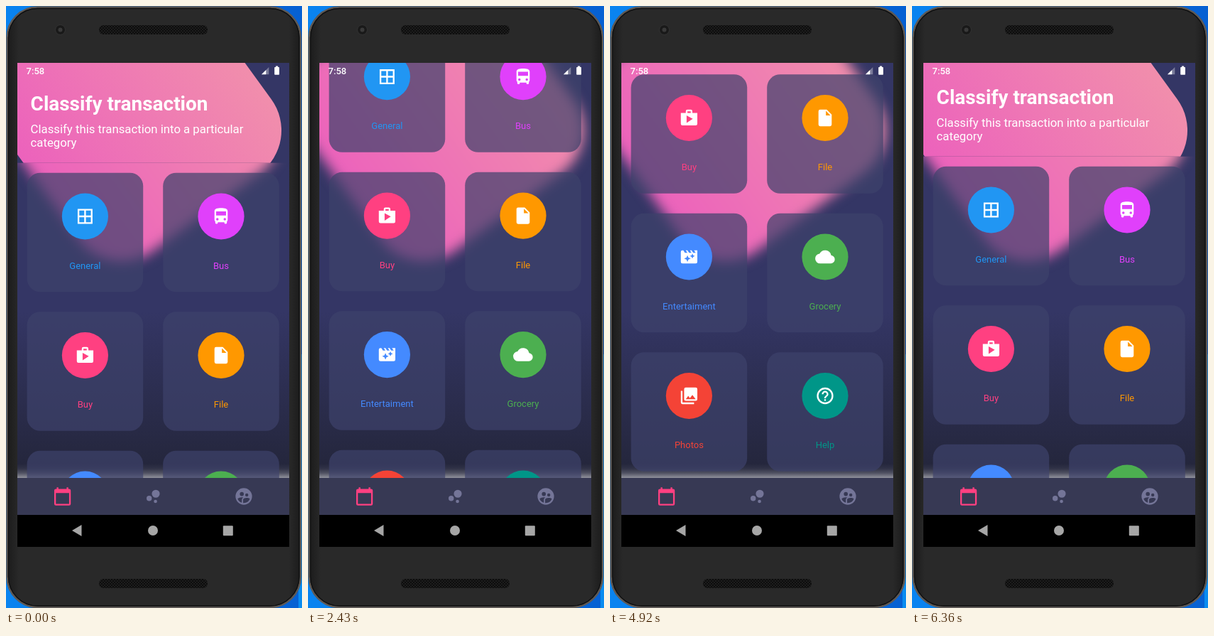
An HTML page that plays this animation: 417 by 847 pixels, repeating every 8550 ms.

```html
<!DOCTYPE html>
<html lang="en">
<head>
<meta charset="utf-8">
<title>Classify transaction</title>
<style>
  html, body { margin: 0; width: 100%; height: 100%; overflow: hidden; background: #0a6fe0; }
  svg { display: block; width: 417px; height: 847px; font-family: Roboto, sans-serif; }
  .label { font-size: 13px; text-anchor: middle; }
  .icon { fill-rule: evenodd; }
</style>
</head>
<body>
<svg viewBox="0 0 417 847">
  <defs>
    <linearGradient id="desk">
      <stop stop-color="#0a84f0"/><stop offset="1" stop-color="#0660d2"/>
    </linearGradient>
    <linearGradient id="shell">
      <stop stop-color="#1b1b1b"/><stop offset=".04" stop-color="#292929"/>
      <stop offset=".96" stop-color="#292929"/><stop offset="1" stop-color="#1b1b1b"/>
    </linearGradient>
    <linearGradient id="night" gradientUnits="userSpaceOnUse" x1="0" y1="430" x2="0" y2="664">
      <stop stop-color="#343665"/><stop offset="1" stop-color="#232539"/>
    </linearGradient>
    <linearGradient id="pink">
      <stop stop-color="#ec62bc"/><stop offset="1" stop-color="#f18eac"/>
    </linearGradient>
    <linearGradient id="haze" x2="0" y2="1">
      <stop stop-color="#fff" stop-opacity="0"/><stop offset=".35" stop-color="#fff" stop-opacity=".06"/>
      <stop offset=".65" stop-color="#fff" stop-opacity=".2"/><stop offset="1" stop-color="#fff" stop-opacity=".5"/>
    </linearGradient>
    <pattern id="mesh" width="4" height="4" patternUnits="userSpaceOnUse">
      <rect width="4" height="4" fill="#0d0d0d"/>
      <circle cx="1" cy="1" r=".8" fill="#303030"/><circle cx="3" cy="3" r=".8" fill="#303030"/>
    </pattern>
    <filter id="blur" filterUnits="userSpaceOnUse" x="-100" y="-120" width="620" height="620" color-interpolation-filters="sRGB">
      <feGaussianBlur stdDeviation="9.3"/>
    </filter>
    <clipPath id="view"><rect x="16" y="80" width="383" height="584"/></clipPath>
    <clipPath id="pane"><rect id="paneBox" x="16" y="221" width="383" height="900"/></clipPath>
    <rect id="box" x="16" y="-13.1" width="335.1" height="335.1" rx="74.5" fill="url(#pink)" transform="rotate(-36 183.55 154.45)"/>
  </defs>

  <!-- phone -->
  <rect width="417" height="847" fill="url(#desk)"/>
  <rect x="412" y="490" width="5" height="357" fill="#0a8cf0"/>
  <rect x="1.5" y="1.5" width="413.5" height="844.5" rx="43" fill="url(#shell)" stroke="#5d5956" stroke-width="2.6"/>
  <rect x="3.5" y="3.5" width="409.5" height="840.5" rx="41" fill="none" stroke="#111" stroke-width="1.4"/>
  <rect x="131" y="27" width="153" height="13" rx="6" fill="url(#mesh)"/>
  <rect x="131" y="806" width="153" height="13" rx="6" fill="url(#mesh)"/>
  <circle cx="76.5" cy="33.5" r="7" fill="#191919" stroke="#343434"/>
  <circle cx="76.5" cy="33.5" r="3" fill="#3a3a3a"/>

  <!-- page -->
  <g clip-path="url(#view)">
    <rect x="16" y="80" width="383" height="584" fill="url(#night)"/>
    <use href="#box"/>
    <g clip-path="url(#pane)">
      <rect x="16" y="80" width="383" height="584" fill="url(#night)"/>
      <g filter="url(#blur)"><use href="#box"/></g>
      <rect x="16" y="644" width="383" height="20" fill="url(#haze)"/>
    </g>
    <g id="content">
      <g fill="#fff">
        <text x="34.6" y="147" font-size="27.93" font-weight="700">Classify transaction</text>
        <g font-size="16.76">
          <text x="34.6" y="178.5">Classify this transaction into a particular</text>
          <text x="34.6" y="198.2">category</text>
        </g>
      </g>
    </g>
    <path id="glow" fill="#2196f3" fill-opacity="0"/>
  </g>

  <!-- status bar -->
  <g fill="#fff">
    <text x="28.6" y="96" font-size="13" font-weight="500">7:58</text>
    <path d="M360 96.3L370.3 86V96.3z" fill-opacity=".35"/>
    <path d="M360 96.3L366.3 90V96.3z"/>
    <path d="M380 86V84.6h3.2V86h1q.8 0 .8.8v9.2q0 .8-.8.8h-5.2q-.8 0-.8-.8v-9.2q0-.8.8-.8z"/>
  </g>

  <!-- bottom bars -->
  <rect x="16" y="664" width="383" height="52" fill="#373954"/>
  <g id="tabs"></g>
  <rect x="16" y="716" width="383" height="45" fill="#000"/>
  <g fill="#a6a6a6">
    <path d="M93 738L106.5 730V746z"/>
    <circle cx="207" cy="738" r="7"/>
    <rect x="305.8" y="731.3" width="14" height="14" rx="1"/>
  </g>
</svg>
<script>
const $ = id => document.getElementById(id);
const LOOP = 8550, STEP = 30, ROW = 195.5, END = 338.8;

const cards = [
  ['General', '#2196f3', 'M3 3v18h18V3zM11 19H5v-6h6zm0-8H5V5h6zm8 8h-6v-6h6zm0-8h-6V5h6z'],
  ['Bus', '#e040fb', 'M4 16V6c0-3.5 3.6-4 8-4s8 .5 8 4v10q0 1.4-1 2.2V20q0 1-1 1h-1q-1 0-1-1v-1H8v1q0 1-1 1H6q-1 0-1-1v-1.8Q4 17.4 4 16zM6 6v5h12V6zM6 15.5a1.5 1.5 0 0 0 3 0 1.5 1.5 0 0 0-3 0zm9 0a1.5 1.5 0 0 0 3 0 1.5 1.5 0 0 0-3 0z'],
  ['Buy', '#ff4081', 'M16 6V4q0-2-2-2h-4q-2 0-2 2v2H2v13q0 2 2 2h16q2 0 2-2V6zM10 4h4v2h-4zM9 18V9l7.5 4z'],
  ['File', '#ff9800', 'M6 2Q4 2 4 4v16q0 2 2 2h12q2 0 2-2V8l-6-6zm7 7V3.5L18.5 9z'],
  ['Entertaiment', '#448aff', 'M18 4l2 3h-3l-2-3h-2l2 3h-3l-2-3H8l2 3H7L5 4H4Q2 4 2 6v12q0 2 2 2h16q2 0 2-2V4zM11.25 15.25L10 18l-1.25-2.75L6 14l2.75-1.25L10 10l1.25 2.75L14 14zM16.94 11.94L16 14l-.94-2.06L13 11l2.06-.94L16 8l.94 2.06L19 11z'],
  ['Grocery', '#4caf50', 'M19.35 10.04A7.49 7.49 0 0 0 5.35 8.04 6 6 0 0 0 6 20h13a5 5 0 0 0 .35-9.96z'],
  ['Photos', '#f44336', 'M22 16V4q0-2-2-2H8Q6 2 6 4v12q0 2 2 2h12q2 0 2-2zM11 12l2 2.7L16 11l4 5H8zM2 6v14q0 2 2 2h14v-2H4V6z'],
  ['Help', '#009688', 'M11 18h2v-2h-2zM12 2a10 10 0 0 0 0 20 10 10 0 0 0 0-20zm0 18a8 8 0 0 1 0-16 8 8 0 0 1 0 16zm0-14a4 4 0 0 0-4 4h2a2 2 0 0 1 4 0c0 2-3 1.75-3 5h2c0-2.25 3-2.5 3-5a4 4 0 0 0-4-4z']
];
const tabs = [
  ['#ff4081', 'M20 3h-1V1h-2v2H7V1H5v2H4Q2 3 2 5v16q0 2 2 2h16q2 0 2-2V5q0-2-2-2zm0 18H4V8h16z'],
  ['#747598', 'M4 14.4a3.2 3.2 0 0 0 6.4 0 3.2 3.2 0 0 0-6.4 0zM12.8 18a2 2 0 0 0 4 0 2 2 0 0 0-4 0zM10.4 8.8a4.8 4.8 0 0 0 9.6 0 4.8 4.8 0 0 0-9.6 0z'],
  ['#747598', 'M12 2a10 10 0 0 0 0 20 10 10 0 0 0 0-20zM13.7 10.3a1.9 1.9 0 0 1 3.8 0 1.9 1.9 0 0 1-3.8 0zM7.2 9.1a2.4 2.4 0 0 1 4.8 0 2.4 2.4 0 0 1-4.8 0zM9.6 15.9v3.7a8 8 0 0 1-5.1-4.9c1-1.1 3.6-1.7 5.1-1.7q.8 0 1.9.2-1.9 1-1.9 2.7zM12 20l-.8-.1v-4c0-1.4 2.9-2.1 4.4-2.1 1 0 2.9.4 3.8 1.1A8 8 0 0 1 12 20z']
];

const icon = (x, y, fill, d) =>
  `<path class="icon" fill="${fill}" d="${d}" transform="translate(${x} ${y}) scale(1.163) translate(-12 -12)"/>`;

const card = ([name, color, d], i) => {
  const x = 111.4 + 191.6 * (i % 2), y = 234.7 + ROW * (i >> 1);
  return `<rect x="${x - 81.8}" y="${y}" width="163.6" height="167.6" rx="18.6" fill="#3e426b" fill-opacity=".7"/>
    <circle cx="${x}" cy="${y + 61.3}" r="32.6" fill="${color}"/>${icon(x, y + 61.3, '#fff', d)}
    <text class="label" x="${x}" y="${y + 135}" fill="${color}">${name}</text>`;
};

$('content').innerHTML += cards.map(card).join('');
$('tabs').innerHTML = tabs.map(([c, d], i) => icon(79.6 + 127.7 * i, 690, c, d)).join('');

// start, end, scroll from, scroll to, skew of the easing
const swipes = [
  [1170, 1830, 0, 164, .724],
  [2250, 2910, 164, END, 1.084],
  [4920, 5550, END, 187.3, .724],
  [5940, 6360, 187.3, 9, 1]
];
const progress = (t, a, b) => Math.min(1, Math.max(0, (t - a + STEP) / (b - a + STEP)));
const smooth = u => u * u * (3 - 2 * u);

function scrollAt(t) {
  let s = 0;
  for (const [a, b, from, to, skew] of swipes)
    if (t >= a) s = from + (to - from) * smooth(progress(t, a, b) ** skew);
  return s;
}

function draw(now) {
  const t = Math.floor(now % LOOP / STEP) * STEP;
  const s = scrollAt(t);
  $('content').setAttribute('transform', `translate(0 ${-s})`);
  $('paneBox').setAttribute('y', 220.7 - s);

  // overscroll glow
  const g = t < 3240 ? 0 : Math.sin(Math.PI * progress(t, 3240, 3960));
  const side = 664 - 37 * g;
  $('glow').setAttribute('d', `M16 664V${side}Q207.5 ${664 - 93 * g} 399 ${side}V664z`);
  $('glow').setAttribute('fill-opacity', .25 * g);
}

const start = performance.now();
(function tick() {
  draw(performance.now() - start);
  requestAnimationFrame(tick);
})();
</script>
</body>
</html>
```
